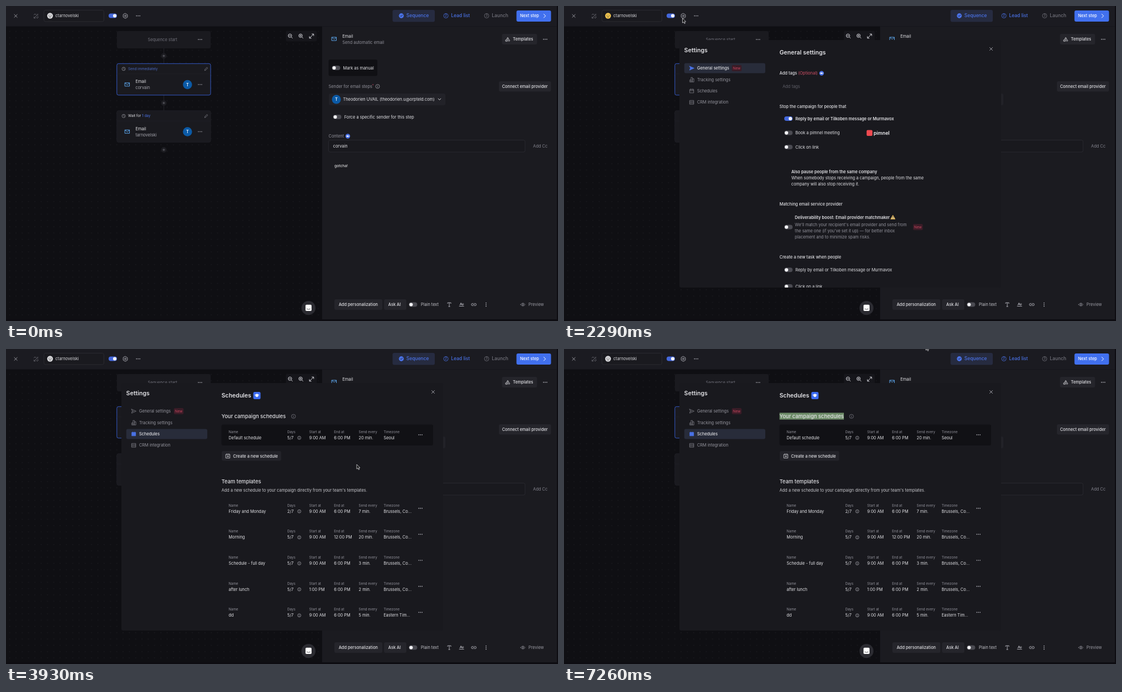
An HTML page that plays this animation: 990x565 px, repeating every 7280 ms.

```html
<!DOCTYPE html>
<html lang="en">
<head>
<meta charset="utf-8">
<title>Campaign settings</title>
<style>
html, body { margin: 0; width: 100%; height: 100%; overflow: hidden; background: #0e0e12; }
svg { display: block; width: 990px; height: 565px; }
text { font-family: Inter, Roboto, "Liberation Sans", sans-serif; white-space: pre; }
</style>
</head>
<body>
<svg id="stage" viewBox="0 0 990 565" xmlns="http://www.w3.org/2000/svg"></svg>
<script>
const LOOP = 7280;
const C = {
  bg: '#0f0f13', panel: '#1b1b20', modal: '#19191e', card: '#1a1a1f', btn: '#25252b',
  line: '#2a2a31', text: '#e2e2e6', mid: '#8c8c95', dim: '#64646d', blue: '#4a72e6', sky: '#5ba3e8'
};

// Text is placed by its left edge and the middle of its capitals.
const text = (x, y, s, color = C.text, size = 7.38, weight = 400, extra = '') =>
  `<text x="${x}" y="${(y + size * .35).toFixed(2)}" font-size="${size}" font-weight="${weight}" fill="${color}" ${extra}>${s}</text>`;
const rect = (x, y, x2, y2, fill, r = 3, stroke = 'none') =>
  `<rect x="${x}" y="${y}" width="${x2 - x}" height="${y2 - y}" rx="${r}" fill="${fill}" stroke="${stroke}"/>`;
const circle = (x, y, r, fill, stroke = 'none', w = .8) =>
  `<circle cx="${x}" cy="${y}" r="${r}" fill="${fill}" stroke="${stroke}" stroke-width="${w}"/>`;
const icon = (x, y, d, color, w = .9, fill = 'none') =>
  `<path transform="translate(${x} ${y})" d="${d}" fill="${fill}" stroke="${color}" stroke-width="${w}" stroke-linecap="round" stroke-linejoin="round"/>`;
const dots = (x, y, color = '#b4b4bc', up = false) =>
  [-2.9, 0, 2.9].map(d => circle(x + (up ? 0 : d), y + (up ? d : 0), .85, color)).join('');
const toggle = (x, y, on = false) =>
  rect(x - 7.5, y - 4, x + 7.5, y + 4, on ? '#4468dc' : '#4a4a51', 4) + circle(x + (on ? 3.5 : -3.5), y, 3.1, '#f2f2f5');
const info = (x, y, r = 3.5, color = '#b0b0b8') =>
  circle(x, y, r, 'none', color, .7) + icon(x, y, `M0 ${-r * .42}v.1M0 ${-r * .02}V${r * .45}`, color, .7);
const mail = (x, y) => icon(x, y, 'M-4 -3H4V3H-4ZM-4 -2.6L0 .6L4 -2.6', C.sky, 1);
const cross = (x, y) => icon(x, y, 'M-2.6 -2.6L2.6 2.6M2.6 -2.6L-2.6 2.6', '#a6a6ae');
const avatar = (x, y, r) => circle(x, y, r, '#0b5aa6') + text(x, y, 'T', '#fff', 7.6, 500, 'text-anchor="middle"');
const help = (x, y) => circle(x, y, 4.2, C.blue) + rect(x - 2.2, y - 1.4, x + 1, y + 1.4, '#dfe6ff', .5) + icon(x, y, 'M1 0L2.4 -1.1V1.1Z', '#dfe6ff', .3, '#dfe6ff');
const badge = (x, y) => rect(x, y - 5.5, x + 17.5, y + 5.5, '#3a1c27', 2) + text(x + 8.8, y, 'New', '#c8465f', 6.32, 400, 'text-anchor="middle"');

const GEAR = 'M0 -4.4L3.8 -2.2V2.2L0 4.4L-3.8 2.2V-2.2ZM1.5 0A1.5 1.5 0 1 1 -1.5 0A1.5 1.5 0 1 1 1.5 0';
const CAL = 'M-3.4 -2.8H3.4V3.4H-3.4ZM-3.4 -.6H3.4M-1.7 -3.8V-2.2M1.7 -3.8V-2.2';

function header() {
  const tab = (x, n, s, color) => circle(x, 17.5, 4, 'none', color, .8) +
    text(x, 17.5, n, color, 5.6, 500, 'text-anchor="middle"') + text(x + 9.3, 17.5, s, color, 8.43, 500);
  return rect(0, 0, 988, 36.5, '#1b1b21', 0) + cross(17.5, 17.8) +
    icon(54, 18, 'M-3.5 3.5L3.5 -3.5M-4 -2L-2 -4L0 -2M2 0L4 2L2 4L0 2M1.5 -3.5L3.5 -1.5M-3.8 1.5V3.8H-1.5', '#6f6f78', .8) +
    rect(68, 7.5, 175.5, 28, '#1a1a1f', 3, '#2a2a30') +
    `<g id="face" fill="#d9d9dc">` + `<circle cx="79" cy="17.5" r="5.2"/>` +
    circle(77.2, 16.4, .7, '#333') + circle(80.8, 16.4, .7, '#333') + icon(79, 18.6, 'M-2.2 0Q0 2.8 2.2 0', '#333', .8) + '</g>' +
    text(88.5, 17.7, 'ctarnovelski', '#d6d6da') + toggle(191.5, 17.5, true) +
    icon(214, 17.8, GEAR, '#b0b0b8') + dots(237, 17.6) +
    rect(693.3, 7, 769, 28.5, '#262b40', 3) + circle(709, 17.5, 4.4, C.blue) +
    icon(709, 17.5, 'M-1.8 .1L-.5 1.4L1.9 -1.3', '#20253a', 1) + text(718, 17.5, 'Sequence', C.blue, 8.43, 500) +
    tab(789, '2', 'Lead list', C.blue) + tab(862, '3', 'Launch', '#73737c') +
    rect(915.5, 8, 977.5, 28, '#4170ee', 3) + text(922, 17.8, 'Next step', '#fff', 7.38, 500) +
    icon(966, 17.8, 'M-1.5 -3.2L1.7 0L-1.5 3.2', '#fff', 1);
}

function flow() {
  const plus = y => circle(283, y, 5, '#1d1d22') + icon(283, y, 'M-1.8 0H1.8M0 -1.8V1.8', '#777780', .7);
  const link = (a, b) => icon(283, a, `M0 0V${b - a}`, '#26262c', 1) + plus((a + b) / 2);
  const step = (y, when, name, stroke) => rect(198.8, y, 367, y + 56.5, C.card, 3, stroke) +
    icon(199.5, y + 18.5, 'M0 0H167', '#222228', .7) +
    circle(211, y + 9.5, 3, 'none', '#a2a2aa', .7) + icon(211, y + 9.5, 'M0 -1.7V0L1.2 .8', '#a2a2aa', .6) + when +
    icon(359, y + 9.5, 'M-2.6 2.6L-2 .6L1.4 -2.8L2.8 -1.4L-.6 2Z', '#8a8a92', .7) +
    mail(217.5, y + 37.5) + text(232.2, y + 32.3, 'Email', C.text, 7.5) +
    text(232.2, y + 43.4, name, '#a4a4ac') + avatar(325.5, y + 37.7, 8.2) + dots(348, y + 37.5, '#92929a');
  return rect(0, 36.5, 567, 562, 'url(#grid)', 0) +
    link(76, 103) + link(160, 188) + plus(258) +
    rect(199, 45, 367, 76, C.card) + text(254.2, 60.3, 'Sequence start', '#70707a') + dots(348, 60) +
    step(103.3, text(219, 112.6, 'Send immediately', '#4b69c0', 6.32), 'corvain', '#3358c4') +
    step(187.8, text(219, 197, 'Wait for <tspan fill="#4a72e6">1 day</tspan>', C.text, 6.32), 'tarnovelski', '#1f1f25') +
    rect(502, 44.5, 557.5, 63.5, '#16161b') +
    [['M-.2 -.7h0M-2.2 -.7H.8', 510], ['M-2.2 -.7H.8M-.7 -2.2V.8', 529]].map(([d, x]) =>
      circle(x - .7, 53.3, 3.1, 'none', '#d4d4da', 1) + icon(x, 54, d + 'M1.7 1.7L3.8 3.8', '#d4d4da', .9)).join('') +
    icon(548, 54, 'M-3.5 3.5L3.5 -3.5M.7 -3.8H3.8V-.7M-3.8 .7V3.8H-.7', '#d4d4da', 1) +
    circle(542.5, 541.7, 12.6, '#2b2b31') + rect(537.2, 535.8, 548, 547, '#fff', 1.8) +
    icon(542.6, 543.4, 'M-3 0Q0 1.9 3 0', '#2b2b31', .8);
}

function editor() {
  return rect(567, 36.5, 988, 562, C.panel, 0) + mail(588.5, 59) +
    text(603.3, 54.5, 'Email', C.text, 7.5) + text(603.3, 65.3, 'Send automatic email', '#8f8f98') +
    rect(889.5, 50, 952.5, 69, C.btn) +
    icon(900, 59.8, 'M0 -3.2L1.6 -.6H-1.6ZM-3.6 1H-.8V3.4H-3.6ZM2.2 .8A1.3 1.3 0 1 1 2.1 .8', C.text, .8) +
    text(909, 59.8, 'Templates', C.text, 7.38, 500) + dots(967, 59.7) +
    rect(578.5, 96, 666, 125.5, '#101014') + toggle(592, 111) + text(604.5, 111, 'Mark as manual') +
    text(578.5, 144.2, 'Sender for email steps<tspan fill="#c8465f" dy="-1.5" font-size="5.5">*</tspan>', '#92929b') + info(666.5, 144.2) +
    rect(884, 135, 977.5, 153.5, C.btn) + text(889.7, 144.2, 'Connect email provider', C.text, 7.38, 500) +
    rect(579, 157, 788, 178, '#222228') + avatar(592.5, 167.5, 8) +
    text(604.5, 167.5, 'Theodorien UVAIL (theodorien.u@orpteld.com)') +
    icon(777.5, 167.3, 'M-2.3 -1.2L0 1.3L2.3 -1.2', C.text) +
    toggle(594, 199) + text(606.7, 199, 'Force a specific sender for this step') +
    text(578.5, 233.8, 'Content', '#92929b') + help(613, 233.5) +
    rect(578.5, 240.5, 931, 262, '#19191e', 3, '#29292f') + text(586.7, 251.3, 'corvain') +
    text(945.3, 251.3, 'Add Cc', '#83838c') + text(589, 286.8, 'gotcha!', '#fff', 6.8) +
    rect(589, 526, 675, 545, C.btn) + text(596.7, 535.5, 'Add personalization', C.text, 7.38, 500) +
    rect(678, 526, 718, 545, C.btn) + text(685.5, 535.5, 'Ask AI', C.text, 7.38, 500) +
    toggle(730, 535.5) + text(744, 535.5, 'Plain text', '#c2c2c8') +
    icon(795, 535.5, 'M-3 -2V-3.3H3V-2M0 -3.3V3.5M-1.2 3.5H1.2', '#b4b4bc') +
    icon(817, 535.5, 'M-4 3H4M-3 1L-1 -3L1 1M-2.2 -.4H.2M2.4 .8A1.3 1.3 0 1 1 2.5 .8', '#b4b4bc') +
    icon(839, 535.5, 'M-1 -2H-2.4A2 2 0 0 0 -2.4 2H-1M1 -2H2.4A2 2 0 0 1 2.4 2H1M-1.7 0H1.7', '#b4b4bc') +
    dots(861, 535.5, '#b4b4bc', true) +
    icon(927, 535.5, 'M-4 0Q0 -5.4 4 0Q0 5.4 -4 0ZM1.3 0A1.3 1.3 0 1 1 -1.3 0A1.3 1.3 0 1 1 1.3 0', '#92929b', .8) +
    text(937, 535.5, 'Preview', '#9a9aa2');
}

function nav(active) {
  const items = [
    ['General settings', 111.5, 'M-4 -3.6L4.2 0L-4 3.6L-2.6 0ZM-2.6 0H0'],
    ['Tracking settings', 132, 'M-3.8 3.8V.6H-1.4V3.8ZM-1.4 3.8V-3.8H1.2V3.8ZM1.2 3.8V-1.4H3.8V3.8Z'],
    ['Schedules', 152.4, CAL],
    ['CRM integration', 172.8, 'M-3.5 -3.4H3.5V3.4H-3.5ZM-3.5 -1.1H3.5M-3.5 1.1H3.5']
  ];
  return text(215.6, 79.2, 'Settings', C.text, 10.5, 600) + items.map(([s, y, d], i) => {
    const on = i === active;
    return (on ? rect(215.7, y - 9, 361, y + 9, '#282c3a') : '') +
      icon(229.2, y, d, on ? C.blue : '#84848d', .75, on ? C.blue : 'none') +
      text(238.7, y, s, on ? C.text : '#95959e', 7.38, on ? 500 : 400);
  }).join('') + badge(301, 111.5);
}

function general() {
  const choice = (y, s, on) => toggle(402.5, y, on) + text(415, y, s, C.text, 7.38, on ? 600 : 400);
  const reply = 'Reply by email or Tilkoben message or Murmavox';
  const para = (x, y, color, lines) => lines.map((s, i) => text(x, y + i * 10.9, s, color)).join('');
  return nav(0) + text(386.5, 83.6, 'General settings', C.text, 10.5, 600) +
    text(386.5, 120.8, 'Add tags <tspan fill="#b8485c">(Optional)</tspan>', C.text, 7.38, 500) + help(462, 120.6) +
    text(392, 144.2, 'Add tags', '#5e5e67') +
    text(386.5, 180, 'Stop the campaign for people that', C.text, 7.38, 500) +
    choice(202, reply, true) + choice(227.6, 'Book a pimnel meeting') + choice(253, 'Click on link') +
    rect(542.7, 222.4, 553.2, 233, '#f04a50', 2) + text(555.3, 227.6, 'pimnel', '#f2f2f5', 8.8, 600) +
    text(407.7, 297, 'Also pause people from the same company', C.text, 7.38, 600) +
    para(407.7, 308.2, C.text, ['When somebody stops receiving a campaign, people from the same', 'company will also stop receiving it.']) +
    text(386.5, 355.2, 'Matching email service provider', C.text, 7.38, 500) +
    text(414, 379.3, 'Deliverability boost: Email provider matchmaker', C.text, 7.38, 600) +
    icon(590, 379, 'M0 -3.6L3.9 3.2H-3.9Z', '#d9a441', .8, '#f4d58c') + icon(590, 379, 'M0 -1.3V.8M0 2.1v.1', '#333', .8) +
    toggle(402.5, 396.5) + badge(626, 396.5) +
    para(414, 392.5, '#92929b', ["We'll match your recipient's email provider and send from", "the same one (if you've set it up) — for better inbox", 'placement and to minimize spam risks.']) +
    text(386.5, 450.8, 'Create a new task when people', C.text, 7.38, 500) +
    choice(473.3, reply) + choice(503, 'Click on a link');
}

function schedules() {
  const cols = [['Name', 399.3], ['Days', 504.5], ['Start at', 543.7], ['End at', 588.2], ['Send every', 632.6], ['Timezone', 677.2]];
  const row = (y, vals) => cols.map(([s, x], i) =>
    text(x, y, s, '#92929b', 6.2) + text(x, y + 10.6, vals[i], C.text)).join('') +
    info(526, y + 10.8, 2.9) + dots(743.3, y + 5.3);
  const zone = 'Brussels, Co...';
  const rows = [
    ['Friday and Monday', '2/7', '9:00 AM', '6:00 PM', '7 min.', zone],
    ['Morning', '5/7', '9:00 AM', '12:00 PM', '20 min.', zone],
    ['Schedule - full day', '5/7', '9:00 AM', '6:00 PM', '3 min.', zone],
    ['after lunch', '5/7', '1:00 PM', '6:00 PM', '2 min.', zone],
    ['dd', '5/7', '9:00 AM', '6:00 PM', '5 min.', 'Eastern Tim...']
  ];
  return nav(2) + text(386.5, 83.6, 'Schedules', C.text, 10.5, 600) +
    rect(443.5, 77, 456.5, 90, '#3d6cf0', 2.5) +
    icon(450, 83.2, 'M-4 -.8L0 -2.8L4 -.8L0 1.2ZM-2.2 .5V2Q0 3.4 2.2 2V.5L0 1.6Z', '#fff', .3, '#fff') +
    '<rect id="mark" x="386.5" y="114.4" width="0" height="12.2" fill="#6d8c68"/>' +
    text(386.5, 120.8, 'Your campaign schedules', C.text, 9.35, 500) + info(515.6, 120.8, 3.6, '#85858e') +
    rect(386.5, 135.5, 766, 173, '#111115') +
    row(148.5, ['Default schedule', '5/7', '9:00 AM', '6:00 PM', '20 min.', 'Seoul']) +
    rect(387, 183, 493.5, 200.5, '#232329') + icon(398, 192, 'M-3.4 -3H3.4V3.6H-3.4ZM-1.7 -4V-3M1.7 -4V-3M-1.4 .4H1.4M0 -1V1.8', C.text, .8) +
    text(407.2, 192, 'Create a new schedule', C.text, 7.38, 500) +
    text(386.5, 237.8, 'Team templates', C.text, 9.35, 500) +
    text(386.5, 253, "Add a new schedule to your campaign directly from your team's templates.", '#c8c8cd') +
    rows.map((r, i) => row(280.4 + i * 46.65, r)).join('');
}

const stage = document.getElementById('stage');
stage.innerHTML = `<defs>
  <pattern id="grid" width="11.3" height="11.3" patternUnits="userSpaceOnUse" x="1" y="40">
    <rect width="11.3" height="11.3" fill="${C.bg}"/><circle cx="5.6" cy="5.6" r=".55" fill="#29292f"/></pattern>
  <clipPath id="box"><rect x="207" y="61" width="577" height="444"/></clipPath></defs>
  <rect width="990" height="565" fill="#0d0c11"/>` + flow() + editor() + header() +
  `<g id="modal" clip-path="url(#box)">${rect(207, 61, 784, 505, C.modal, 3)}${cross(766, 77)}
  <g id="general">${general()}</g><g id="schedules">${schedules()}</g></g>
  <g id="cursor">` +
  '<path id="arrow" d="M0 0V8.2L2 6.5L3.4 9.5L4.8 8.9L3.4 6H6Z" fill="#111" stroke="#d8d8dc" stroke-width=".8" stroke-linejoin="round"/>' +
  '<path id="beam" d="M-1.6 -4Q0 -4 0 -3Q0 -4 1.6 -4M0 -3V4M-1.6 5Q0 5 0 4Q0 5 1.6 5" fill="none" stroke="#1b1b20" stroke-width=".9"/></g>';

const el = Object.fromEntries(['face', 'modal', 'general', 'schedules', 'mark', 'cursor', 'arrow', 'beam']
  .map(id => [id, document.getElementById(id)]));
const show = (node, on) => node.setAttribute('display', on ? 'inline' : 'none');

// Pointer stops: time, x, y
const path = [
  [540, 262, 62], [740, 214, 23], [1240, 214, 23], [1300, 212, 21], [2290, 212, 21], [2370, 255, 105],
  [2630, 262, 125], [2700, 275, 147], [2950, 262, 151], [3740, 262, 151], [3930, 629, 207], [4350, 629, 207],
  [4530, 492, 139], [5480, 492, 139], [5500, 487, 135], [6210, 387, 121], [6280, 387, 121], [6370, 478, 122],
  [6440, 478, 122], [6460, 493, 122], [6680, 493, 122], [6730, 508, 122], [7140, 508, 122], [7260, 649, -6]
];
function pointer(t) {
  const i = path.findIndex(p => p[0] > t);
  if (i < 0) return path[path.length - 1].slice(1);
  if (i === 0) return path[0].slice(1);
  const [t0, x0, y0] = path[i - 1], [t1, x1, y1] = path[i], k = (t - t0) / (t1 - t0);
  return [x0 + (x1 - x0) * k, y0 + (y1 - y0) * k];
}

function draw(t) {
  const [x, y] = pointer(t), typing = t >= 6100 && t < 7160;
  show(el.modal, t >= 1780);
  show(el.general, t >= 1800 && t < 3270);
  show(el.schedules, t >= 3270);
  el.face.setAttribute('fill', t >= 1800 && t < 3270 ? '#f3c64f' : '#d9d9dc');
  el.mark.setAttribute('width', t < 6280 ? 0 : t >= 6730 ? 115.5 : Math.min(115.5, Math.max(0, x - 386.5)));
  show(el.cursor, t >= 540);
  show(el.arrow, !typing);
  show(el.beam, typing);
  el.cursor.setAttribute('transform', `translate(${x.toFixed(2)} ${y.toFixed(2)})`);
}

const start = performance.now();
function tick() {
  draw((performance.now() - start) % LOOP);
  requestAnimationFrame(tick);
}
tick();
</script>
</body>
</html>
```
